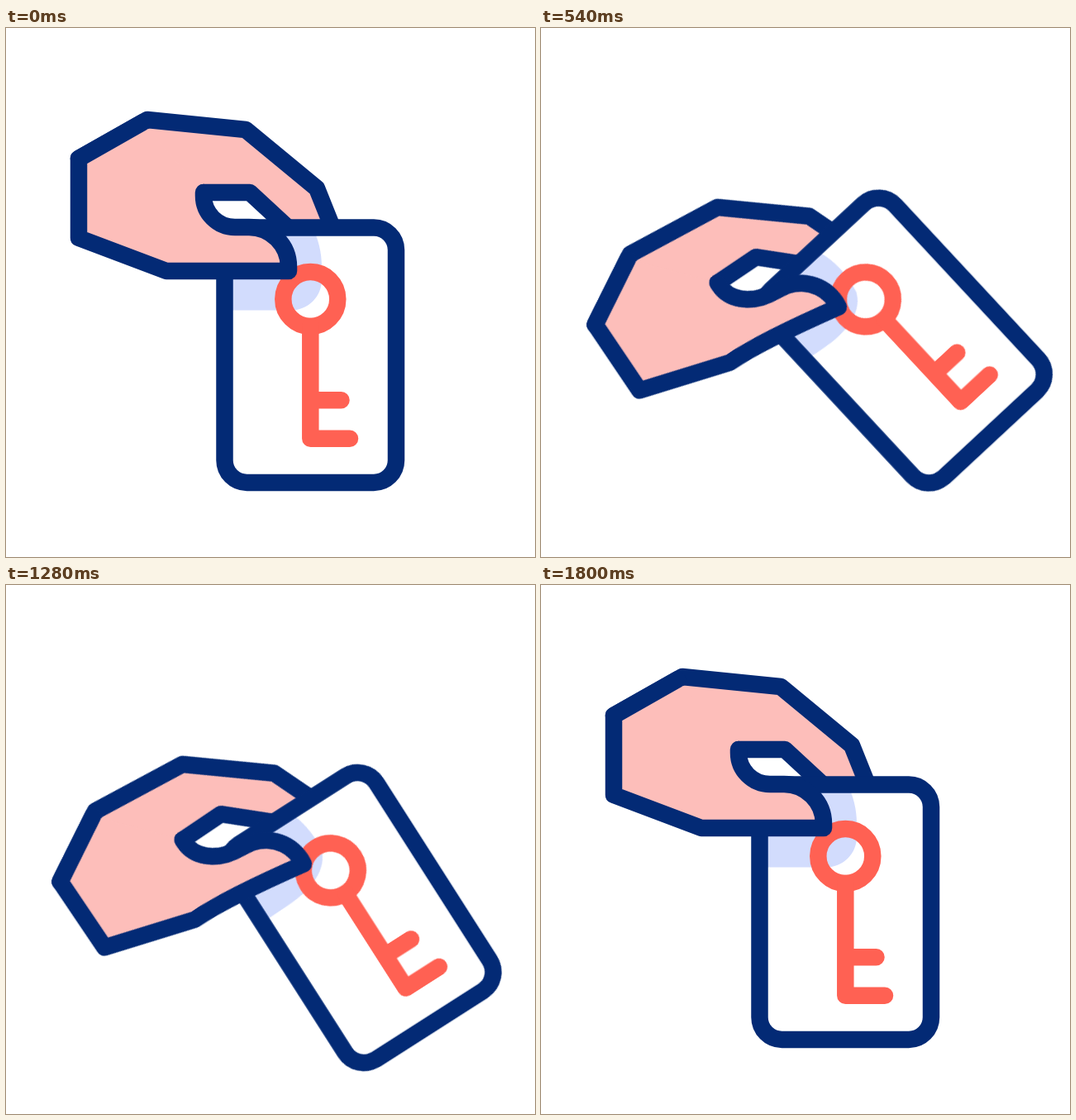
Recreate the animation shown at these times as an HTML page. Size 640 by 640 pixels, loop 2.02 s.

```html
<!DOCTYPE html>
<html lang="en">
<head>
<meta charset="utf-8">
<title>Handing over a key card</title>
<style>
  @property --swing { syntax: "<angle>"; inherits: true; initial-value: 0deg; }

  html, body { margin: 0; height: 100%; overflow: hidden; background: #fff; }
  svg { display: block; width: 100vw; height: 100vh; }

  .line { stroke: #032a75; fill: none; }
  .key { stroke: #ff6153; fill: none; }
  .line, .key { stroke-width: 20.5; stroke-linecap: round; stroke-linejoin: round; }
  .skin { fill: #fdbeba; }

  .hand, .thumb, .shade {
    animation: 2020ms cubic-bezier(.3333, 0, .6667, 1) infinite;
  }
  .hand { transform-origin: 128px 178px; animation-name: tilt, swing; }
  .thumb { animation-name: press; }
  .shade { fill: #d2dcfd; animation-name: shade; }

  /* the card hangs from the pinch point */
  .card, .level { transform-origin: 293.8px 270px; }
  .card { transform: rotate(var(--swing)); }
  .level { transform: rotate(calc(-1 * var(--swing))); }

  @keyframes tilt {
    0%, 89.109%, 100% { transform: translate(0px, 0px) rotate(0deg); }
    19.802%, 69.307% { transform: translate(-18.1px, 175.1px) rotate(-34deg); }
  }
  @keyframes swing {
    0%, 79.208%, 100% { --swing: 0deg; }
    19.802% { --swing: -20deg; }
    34.901% { --swing: 5deg; }
    47.525% { --swing: -6.9deg; }
    65.347% { --swing: 1.7deg; }
  }
  @keyframes press {
    0%, 89.109%, 100% {
      d: path("M165 114.4L88 158L88 254L194 294C240 294 290 294 342 294L342 289C342 262.5 320.5 241 294 241L277 241C256 241 239 224 239 203L239 199");
    }
    19.802%, 69.307% {
      d: path("M165 114.4L88 158L88 254L197 287C240 287 295 296 344 305L344.5 299C345 272 325 249 297 247L281 245C258 241 239 224 239 203L239 199");
    }
  }
  @keyframes shade {
    0%, 89.109%, 100% {
      d: path("M250 341.5L345 341.5C365.5 341.5 382 325 382 304.5L382 289C382 270 377 252 369 238L250 238Z");
    }
    19.802%, 69.307% {
      d: path("M250 336L300 336C336 336 364 326 372 302L373 288C373 268 369 250 361 236L250 238Z");
    }
  }
</style>
</head>
<body>
<svg viewBox="0 0 640 640">
  <defs>
    <clipPath id="face"><rect x="264.5" y="241.5" width="207.5" height="308.5" rx="27"/></clipPath>
  </defs>
  <g class="hand">
    <path class="skin" d="M398 249L376 194 290 123 171 111 88 158 239 199H295L348 248Z"/>
    <path class="line" d="M398 249L376 194 290 123 171 111 88 158M239 199H295L348 248"/>
    <g class="card">
      <rect x="264.5" y="241.5" width="207.5" height="308.5" rx="27" fill="#fff"/>
      <g clip-path="url(#face)">
        <g class="level">
          <path class="shade" d="M250 341.5L345 341.5C365.5 341.5 382 325 382 304.5L382 289C382 270 377 252 369 238L250 238Z"/>
        </g>
      </g>
      <rect class="line" x="264.5" y="241.5" width="207.5" height="308.5" rx="27"/>
      <g class="key">
        <circle cx="368.3" cy="328" r="33"/>
        <path d="M368.3 361V496.7H416M368.3 450.2H405.5"/>
      </g>
    </g>
    <path class="line thumb" style="fill: #fdbeba" d="M165 114.4L88 158L88 254L194 294C240 294 290 294 342 294L342 289C342 262.5 320.5 241 294 241L277 241C256 241 239 224 239 203L239 199"/>
  </g>
</svg>
</body>
</html>
```
